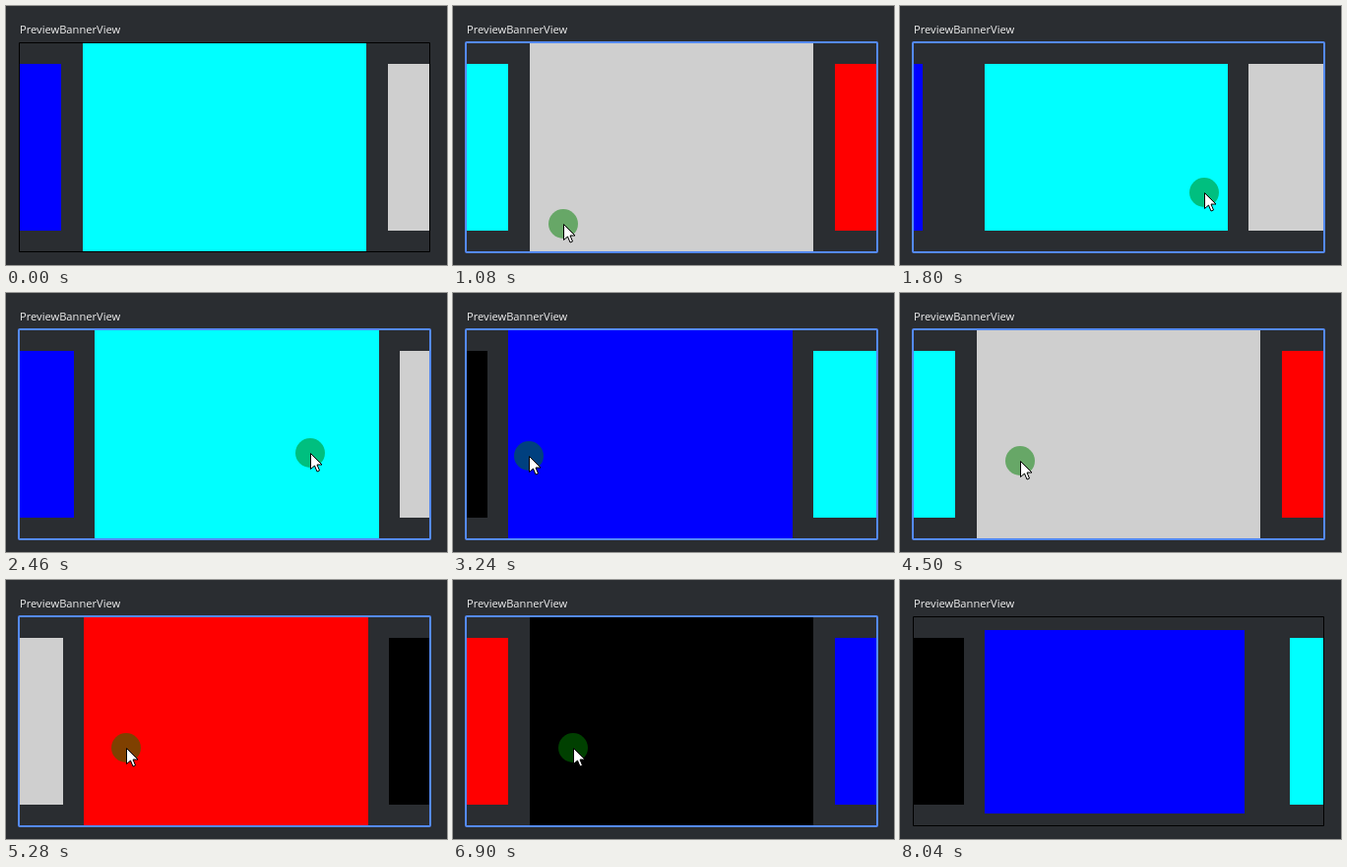
Write an HTML page with a canvas that moves like this. It is 448 px wide and 264 px high and loops after 8.1 s.

```html
<!DOCTYPE html>
<html lang="en">
<head>
<meta charset="utf-8">
<title>Banner preview</title>
<style>
  html, body { margin: 0; width: 100%; height: 100%; overflow: hidden; background: #2a2d31; }
  canvas { position: absolute; left: 0; top: 0; }
  p { position: absolute; left: 14px; top: 16px; margin: 0; color: #eee;
      font: 11.15px/16px "Open Sans", "Noto Sans", sans-serif; }
</style>
</head>
<body>
<canvas id="stage" width="448" height="264"></canvas>
<p>PreviewBannerView</p>
<script>
const ctx = document.getElementById('stage').getContext('2d');
const LOOP = 8100, TICK = 60;
const ENTER = 480, LEAVE = 7260, GONE = 7320;
const PAGE = 288, STRIDE = PAGE + 22, LEFT = 78, MIDDLE = 144;
const AUTO_START = 4836, AUTO_EVERY = 1440;
const colors = ['#00f', '#0ff', '#cfcfcf', '#f00', '#000'];

// Hand flicks: when the page lets go and where the pointer stops
const flicks = [
  { at: 600, dir: 1, x: 112, y: 222 },
  { at: 1580, dir: -1, x: 309, y: 190 },
  { at: 2442, dir: -1, x: 309, y: 163 },
  { at: 3215, dir: 1, x: 77, y: 166 },
  { at: 4015, dir: 1, x: 122, y: 171 }
];
const turns = [...flicks];
for (let at = AUTO_START; at < LOOP; at += AUTO_EVERY) turns.push({ at, dir: 1 });

const ramp = (t, from, to) => Math.max(0, Math.min(1, (t - from) / (to - from)));
const mix = (a, b, f) => a + (b - a) * f;

function pager(t) {
  let from = 1, to = 1, age = LOOP;
  for (const { at, dir } of turns) {
    if (t < at) break;
    from = to;
    to += dir;
    age = t - at;
  }
  return { from, to, age };
}

function drawPages(t) {
  const { from, to, age } = pager(t);
  const x = age * 0.017;
  // Critically damped spring
  const rest = Math.trunc((to - from) * STRIDE * (1 + x) * Math.exp(-x));
  const bleed = rest ? 1 : 0;
  const lo = rest ? Math.min(from, to) : to;
  const hi = rest ? Math.max(from, to) : to;
  for (let i = lo - 1; i <= hi + 1; i++) {
    let size = 0;
    if (i === to) size = ramp(age, 244, 442);
    else if (i === from) size = 1 - ramp(age, 60, 180);
    const grow = Math.round(42 * size);
    const w = PAGE - 42 + grow, h = 170 + grow;
    const left = LEFT + (i - to) * STRIDE + rest;
    ctx.fillStyle = colors[(i + colors.length) % colors.length];
    ctx.fillRect(i >= hi ? left : left + PAGE - w, Math.round(MIDDLE - h / 2), w + bleed, h);
  }
}

function drawFrame(hover) {
  ctx.lineWidth = hover ? 2 : 1;
  ctx.strokeStyle = hover ? '#548af7' : '#000';
  ctx.beginPath();
  if (hover) ctx.roundRect(13, 37, 418, 214, 1);
  else ctx.rect(13.5, 37.5, 417, 213);
  ctx.stroke();
}

// The pointer moves to the far side, sweeps across in the flick, then waits
function pointerAt(t) {
  let pos = { x: 395, y: 228 };
  for (const { at, dir, x, y } of flicks) {
    const back = ramp(t, at - 400, at - 100);
    const sweep = ramp(t, at - 100, at + 18);
    const side = dir > 0 ? 340 : 110;
    pos = {
      x: mix(mix(pos.x, side, back), x, sweep),
      y: mix(pos.y, y, back)
    };
  }
  const exit = ramp(t, 7140, GONE);
  return { x: mix(pos.x, 170, exit), y: mix(pos.y, 264, exit) };
}

const arrow = new Path2D('M.5 .5V16.5L4.5 13L7 19L9.5 18L7 12H12Z');

function drawPointer(t) {
  const { x, y } = pointerAt(t);
  ctx.save();
  ctx.translate(Math.round(x), Math.round(y));
  ctx.fillStyle = 'rgba(0, 128, 0, .5)';
  ctx.beginPath();
  ctx.arc(0, 0, 15, 0, 7);
  ctx.fill();
  ctx.fillStyle = '#fff';
  ctx.strokeStyle = '#000';
  ctx.lineWidth = 1;
  ctx.fill(arrow);
  ctx.stroke(arrow);
  ctx.restore();
}

function draw(t) {
  ctx.clearRect(0, 0, 448, 264);
  ctx.save();
  ctx.beginPath();
  ctx.rect(14, 38, 416, 212);
  ctx.clip();
  drawPages(t);
  ctx.restore();
  drawFrame(t >= ENTER && t < LEAVE);
  if (t >= ENTER && t < GONE) drawPointer(t);
}

const begin = performance.now();
function loop() {
  const t = (performance.now() - begin) % LOOP;
  draw(Math.floor(t / TICK) * TICK);
  requestAnimationFrame(loop);
}
loop();
</script>
</body>
</html>
```
